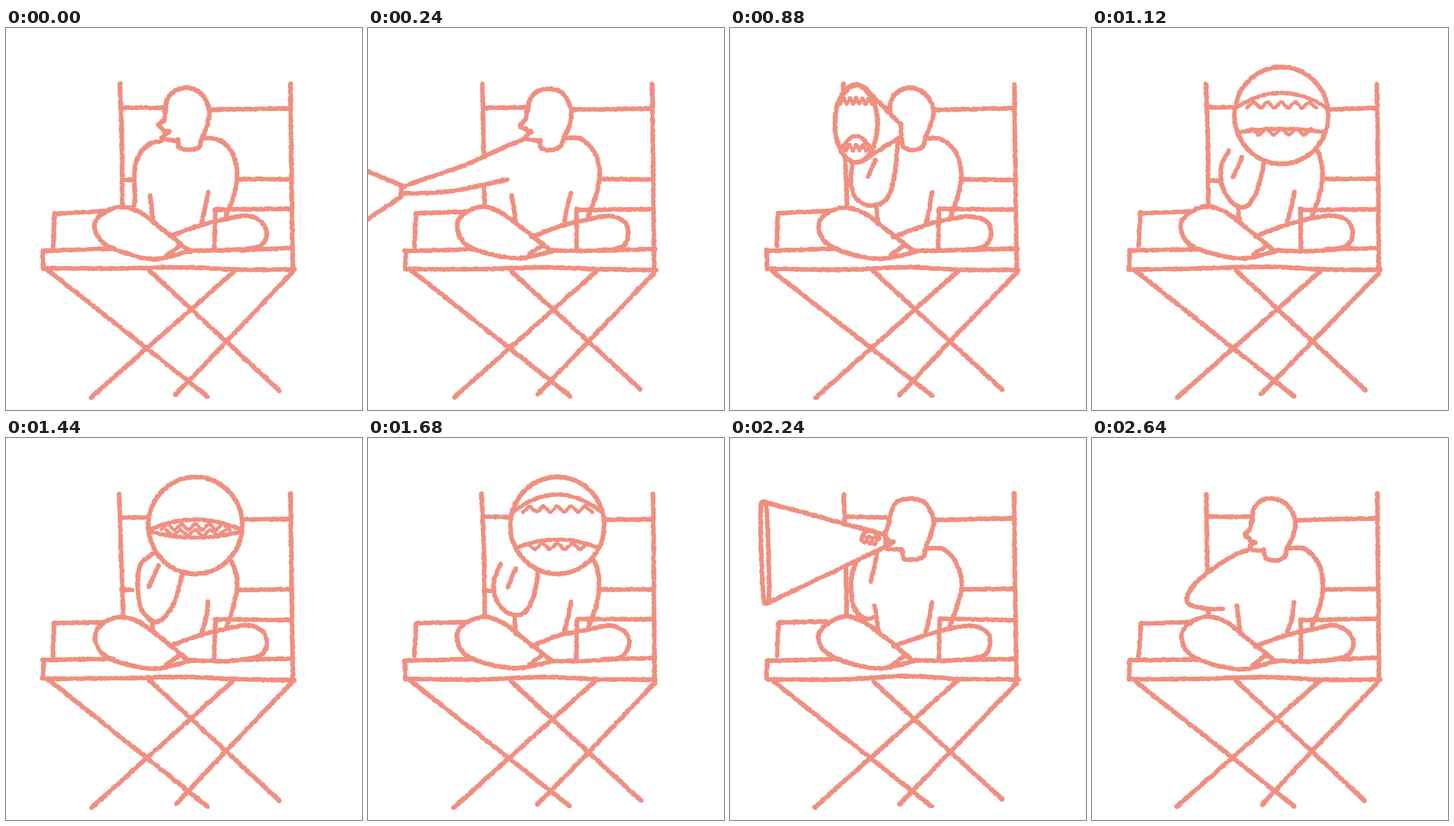
Write an HTML page with a canvas that moves like this. It is 485x520 px and loops after 2720 ms.

```html
<!DOCTYPE html>
<html lang="en">
<head>
<meta charset="utf-8">
<title>Loudhailer sketch</title>
<style>
  html, body { margin: 0; width: 100%; height: 100%; overflow: hidden; background: #fff; }
  canvas { display: block; width: 485px; height: 520px; }
</style>
</head>
<body>
<canvas id="stage" width="485" height="520"></canvas>
<script>
const ctx = document.getElementById('stage').getContext('2d');
const INK = '#f08f80', PAPER = '#fff';
const STEP = 80, TURN = 17;   // drawings 0..17, then back again
const BOIL = 2;               // redraw wobble, in px

const chair = [
  '155,76 157,150 159,240', '388,76 389,200 391,330',   // posts
  '159,108 214,108', '279,111 386,110',                 // slats
  '158,207 173,207', '317,206 388,206',
  '66,252 64,297', '66,252 133,250',                    // cushions
  '285,247 284,301', '285,247 389,247',
  '50,303 146,301', '320,302 391,300',                  // seat
  '51,303 50,328', '51,328 150,328 240,325 315,329 393,329',
  '58,330 275,501', '310,331 116,503',                  // folding legs
  '195,330 372,493', '390,333 300,427 231,499'
];
const torso = [
  '197,228 202,266', '276,223 272,244 267,264',
  '268,150 290,152 308,169 315,198 310,229 300,256'
];
const front = [
  // head, face, collar
  '218,115 220,98 230,86 249,82 267,91 277,112 274,133 267,150 262,162 248,166 236,163 234,152',
  '217,111 215,124 208,132 214,137 216,140 223,141 216,146 213,150',
  '234,153 214,151',
  // crossed legs, foot
  '251,304 213,274 182,251 155,244 131,253 121,270 131,292 160,306 205,314 251,304',
  '223,284 260,270 300,260 330,256 350,265 355,282 343,298 300,303 250,303',
  '219,309 239,295'
];

// Poses by drawing number, blended in between.
const arm = {
  0: '213,153 194,159 179,177 175,200 176,224 176,237 172,246',
  3: '213,152 185,162 130,188 60,212 40,224 110,222 190,205',
  6: '172,172 167,185 165,205 167,228 176,241 187,246 197,243',
  11: '167,182 165,212 174,235 194,241 213,232 224,205 230,152',
  16: '200,158 183,172 179,200 186,235 207,250 228,228 240,187'
};
const sleeve = { 6: '200,157 191,195', 11: '198,180 187,203', 16: '209,173 195,203' };
// rim centre, rim radii, tip, "lean squareness"
const horn = {
  3: '-70,235 5,69 45,222 .03,.4',
  6: '47.5,156 5,69 212,140 .03,.4',
  11: '172,130 29,53 233,140 0,1',
  13: '258,119 64,66 258,125 0,1'
};
const TIP = 8;   // half height of the mouthpiece

const points = s => s.split(' ').map(p => p.split(',').map(Number));
const mix = (a, b, t) => a + (b - a) * t;
const clamp = v => Math.min(1, Math.max(0, v));
const range = (n, fn) => Array.from({ length: n + 1 }, (_, i) => fn(i / n));

let seed = 1;
function rnd() {
  seed = (seed + 0x6D2B79F5) | 0;
  let t = Math.imul(seed ^ seed >>> 15, 1 | seed);
  t ^= t + Math.imul(t ^ t >>> 7, 61 | t);
  return ((t ^ t >>> 14) >>> 0) / 4294967296;
}
const jitter = size => (rnd() - .5) * size;
const boil = pts => pts.map(([x, y]) => [x + jitter(BOIL), y + jitter(BOIL)]);

// Blend of the two nearest poses; nothing before the first one.
function pose(keys, n) {
  const ks = Object.keys(keys).map(Number);
  const a = ks.filter(k => k <= n).pop(), b = ks.find(k => k > n);
  if (a === undefined) return null;
  const from = points(keys[a]);
  if (b === undefined) return from;
  const to = points(keys[b]), t = (n - a) / (b - a);
  return from.map((p, i) => p.map((v, j) => mix(v, to[i][j], t)));
}

function spline(a, b, c, d, t) {
  return b + .5 * t * (c - a + t * (2 * a - 5 * b + 4 * c - d + t * (3 * (b - c) + d - a)));
}

// Crayon line: overlapping blots of uneven size.
function crayon(pts, size = 2.3) {
  ctx.fillStyle = INK;
  ctx.beginPath();
  for (let i = 0; i < pts.length - 1; i++) {
    const b = pts[i], c = pts[i + 1], a = pts[i - 1] || b, d = pts[i + 2] || c;
    const n = Math.max(1, Math.ceil(Math.hypot(c[0] - b[0], c[1] - b[1])));
    for (let j = 0; j <= n; j++) {
      const [x, y] = [0, 1].map(k => spline(a[k], b[k], c[k], d[k], j / n) + jitter(1.4));
      const r = size + rnd();
      ctx.moveTo(x + r, y);
      ctx.arc(x, y, r, 0, 7);
    }
  }
  ctx.fill();
}

function blank(pts) {
  ctx.fillStyle = PAPER;
  ctx.beginPath();
  pts.forEach(p => ctx.lineTo(...p));
  ctx.fill();
}

const sketch = list => list.forEach(s => crayon(boil(points(s))));

function drawArm(n) {
  const limb = boil(pose(arm, n)), fold = pose(sleeve, n);
  blank(limb);
  crayon(limb);
  if (fold) crayon(boil(fold));
}

function drawHorn(n) {
  const h = pose(horn, n);
  if (!h) return;
  const [[cx, cy], [rx, ry], [tx, ty], [lean, square]] = h;
  const rim = a => {
    const c = Math.cos(a), y = ry * Math.sin(a);
    return [cx + Math.sign(c) * rx * Math.abs(c) ** square + y * lean, cy + y];
  };
  // line from the mouthpiece that touches the rim
  const edge = side => {
    const tip = [tx, ty + side * TIP];
    const u = (tip[0] - cx) / rx, v = (tip[1] - cy) / ry, d = Math.hypot(u, v);
    return d > 1 && [rim(Math.atan2(v, u) + side * Math.acos(1 / d)), tip];
  };
  const top = edge(-1), low = edge(1), ring = range(40, t => rim(t * 2 * Math.PI));
  blank(ring);
  if (top && low) {
    blank([...top, low[1], low[0]]);
    [top, low, [top[1], low[1]]].forEach(line => crayon(line));
  }
  crayon(ring);
  if (n > 3 && n < 8) drawHand(tx - 21, ty - 1);
  if (n > 8) drawMouth(clamp((16 - n) / 5), (u, v) => [cx + u * rx, cy + v * ry]);
}

function drawHand(x, y) {
  const oval = (ox, oy, rx, ry, turn) =>
    range(10, t => [x + ox - rx * Math.cos(t * turn), y + oy + ry * -Math.sin(t * turn)]);
  crayon(oval(0, 0, 12, 13, Math.PI), 2);
  for (let i = 0; i < 3; i++) crayon(oval(i * 7 - 8, i - 1, 3, 5, 2 * Math.PI), 1.4);
}

// Lips and teeth inside the rim; open runs from 0 to 1.
function drawMouth(open, place) {
  const lip = (corner, middle) => {
    const reach = Math.sqrt(1 - corner * corner);
    crayon(range(12, t => {
      const s = 2 * t - 1;
      return place(s * reach, mix(middle, corner, s * s));
    }), 2);
  };
  const teeth = (v, reach, count, dir) => crayon(range(count * 4, t => {
    const [x, y] = place((2 * t - 1) * reach, v);
    return [x, y + dir * 4 * Math.cos(t * count * 2 * Math.PI)];
  }), 1.6);
  lip(mix(.1, -.5, open), mix(-.12, -.98, open));
  lip(mix(.12, .7, open), mix(.25, .32, open));
  teeth(mix(.03, -.58, open), .74, 5, 1);
  teeth(mix(.15, .62, open), .64, 4, -1);
}

function draw(n) {
  seed = 97 + n * 1013;
  ctx.fillStyle = PAPER;
  ctx.fillRect(0, 0, 485, 520);
  sketch(chair);
  sketch(torso);
  drawArm(n);
  sketch(front);
  drawHorn(n);
}

const start = performance.now();
let shown = -1;
function tick() {
  const k = Math.floor((performance.now() - start) / STEP) % (2 * TURN);
  const n = Math.min(k, 2 * TURN - k);
  if (n !== shown) draw(shown = n);
  requestAnimationFrame(tick);
}
tick();
</script>
</body>
</html>
```
